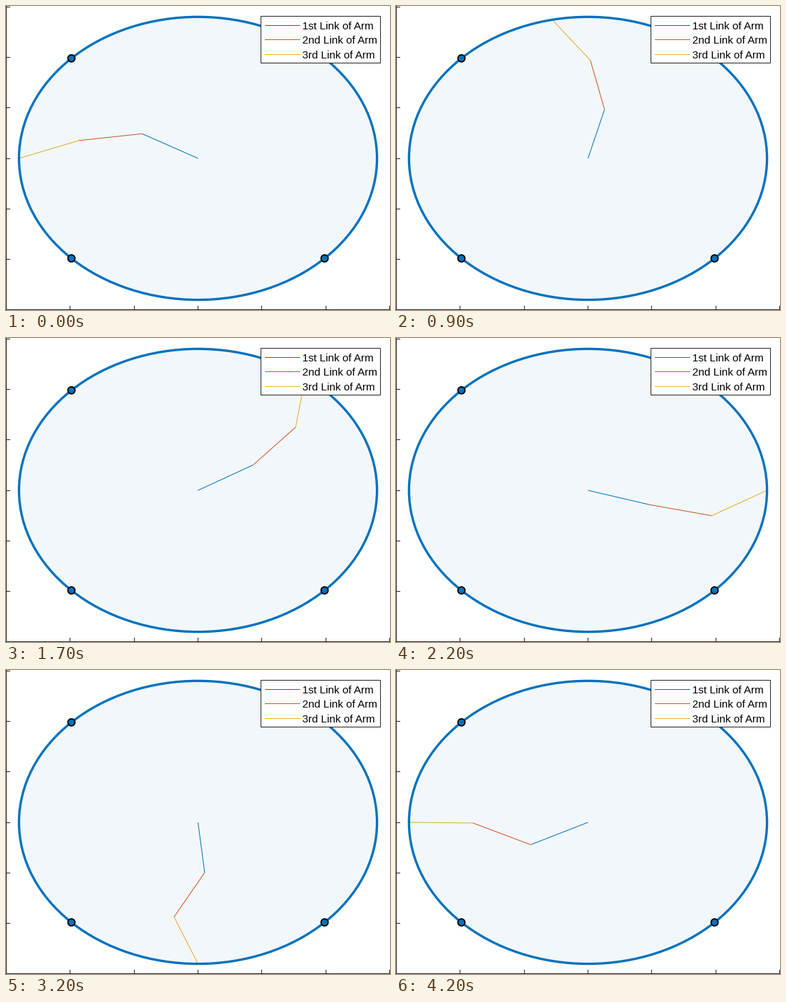
These frames come from a looping animation (543 px wide and 429 px high, 4300 ms). A matplotlib script:

```python
import numpy as np
import matplotlib.pyplot as plt
from matplotlib.animation import FuncAnimation
from matplotlib.patches import Ellipse, Rectangle

W, H, DPI = 543, 429, 64
PX = 72 / DPI                      # points per pixel
CX, CY, SX, SY = 271.5, 215.0, 90.4, 71.3
REACH, STEPS = 2.8, 20             # circle radius, steps per half turn
BLUE, ORANGE, YELLOW, INK = "#0072bd", "#d95319", "#edb120", "#262626"

fig = plt.figure(figsize=(W / DPI, H / DPI), dpi=DPI, facecolor="white")
ax = fig.add_axes([0, 0, 1, 1])
ax.set_xlim(0, W)
ax.set_ylim(H, 0)
ax.axis("off")


def line(xs, ys, color, z=2):
    return ax.plot(xs, ys, color=color, lw=PX, zorder=z, snap=False,
                   solid_capstyle="butt")[0]


def to_px(x, y):
    return CX + SX * x, CY - SY * y


def turned(k):
    """Angle swept by the tip after step k; x advances evenly."""
    half, i = divmod(k, STEPS + 1)
    return half * np.pi + np.arccos(1 - 2 * i / STEPS)


# Bend of the arm: position on the closed curve of poses that reach the circle.
KEY_TURN = np.array([turned(k) for k in (0, 8, 16, 21, 27, 35, 41)])
KEY_BEND = np.radians([14.5, 27.5, 39.4, 55.8, 86.5, 117.7, 151.5])
KEY_RATE = np.gradient(KEY_BEND, KEY_TURN)


def bend_at(t):
    i = int(np.clip(np.searchsorted(KEY_TURN, t) - 1, 0, len(KEY_TURN) - 2))
    h = KEY_TURN[i + 1] - KEY_TURN[i]
    u = (t - KEY_TURN[i]) / h
    return ((1 + 2 * u) * (1 - u) ** 2 * KEY_BEND[i]
            + u * (1 - u) ** 2 * h * KEY_RATE[i]
            + u * u * (3 - 2 * u) * KEY_BEND[i + 1]
            + u * u * (u - 1) * h * KEY_RATE[i + 1])


def arm(k):
    """Joints of the three unit links as complex numbers."""
    t = turned(k)
    psi = bend_at(t)
    b_dir = np.sin(psi) * 2 / np.sqrt(3)
    a_dir = np.cos(psi) - b_dir / 2
    lo, hi = 0.3, 1.3
    for _ in range(40):            # size of the bend that gives the right reach
        r = (lo + hi) / 2
        links = np.exp(1j * r * np.array([0, a_dir, a_dir + b_dir]))
        if abs(links.sum()) > REACH:
            lo = r
        else:
            hi = r
    links = links * np.exp(1j * (np.pi - t - np.angle(links.sum())))
    return np.concatenate([[0], np.cumsum(links)])


# Axes
line([0.5, 0.5], [0, H], INK)
line([0, W], [428.5, 428.5], INK)
for n in range(-3, 4):
    x, y = to_px(n, n)
    x, y = (np.floor(v) + 0.5 for v in (x, y))
    line([x, x], [423, H], INK)
    line([0, 6], [y, y], INK)

# Circle and its handles
size = 2 * REACH * SX, 2 * REACH * SY
ax.add_patch(Ellipse((CX, CY), *size, lw=0, facecolor=BLUE, alpha=0.05,
                     zorder=4))
ax.add_patch(Ellipse((CX, CY), *size, fill=False, edgecolor=BLUE,
                     lw=10 / 3 * PX, zorder=5))
d = REACH * np.sqrt(0.5)
for corner in ((-d, d), (-d, -d), (d, -d)):
    ax.add_patch(Ellipse(to_px(*corner), 10, 10, facecolor=BLUE,
                         edgecolor="black", lw=1.8 * PX, zorder=6))

# Legend
ax.add_patch(Rectangle((360.5, 14.5), 169, 66, facecolor="white",
                       edgecolor=INK, lw=PX, snap=False, zorder=7))
rows = [("1st", 27.5, BLUE), ("2nd", 47.5, ORANGE), ("3rd", 68.5, YELLOW)]
for (name, y, color), base in zip(rows, (33, 53, 74)):
    line([366, 416], [y, y], color, z=8)
    ax.text(419, base, name + " Link of Arm", family="Liberation Sans",
            size=15.3 * PX, color="black", va="baseline", zorder=8)

links = [line([], [], c, z=3) for c in (BLUE, ORANGE, YELLOW)]


def draw(frame):
    joints = arm(max(frame - 1, 0))
    xs, ys = to_px(joints.real, joints.imag)
    for i, link in enumerate(links):
        link.set_data(xs[i:i + 2], ys[i:i + 2])
    return links


anim = FuncAnimation(fig, draw, frames=43, interval=100, repeat=True,
                     repeat_delay=0, blit=False)
plt.show()
```
